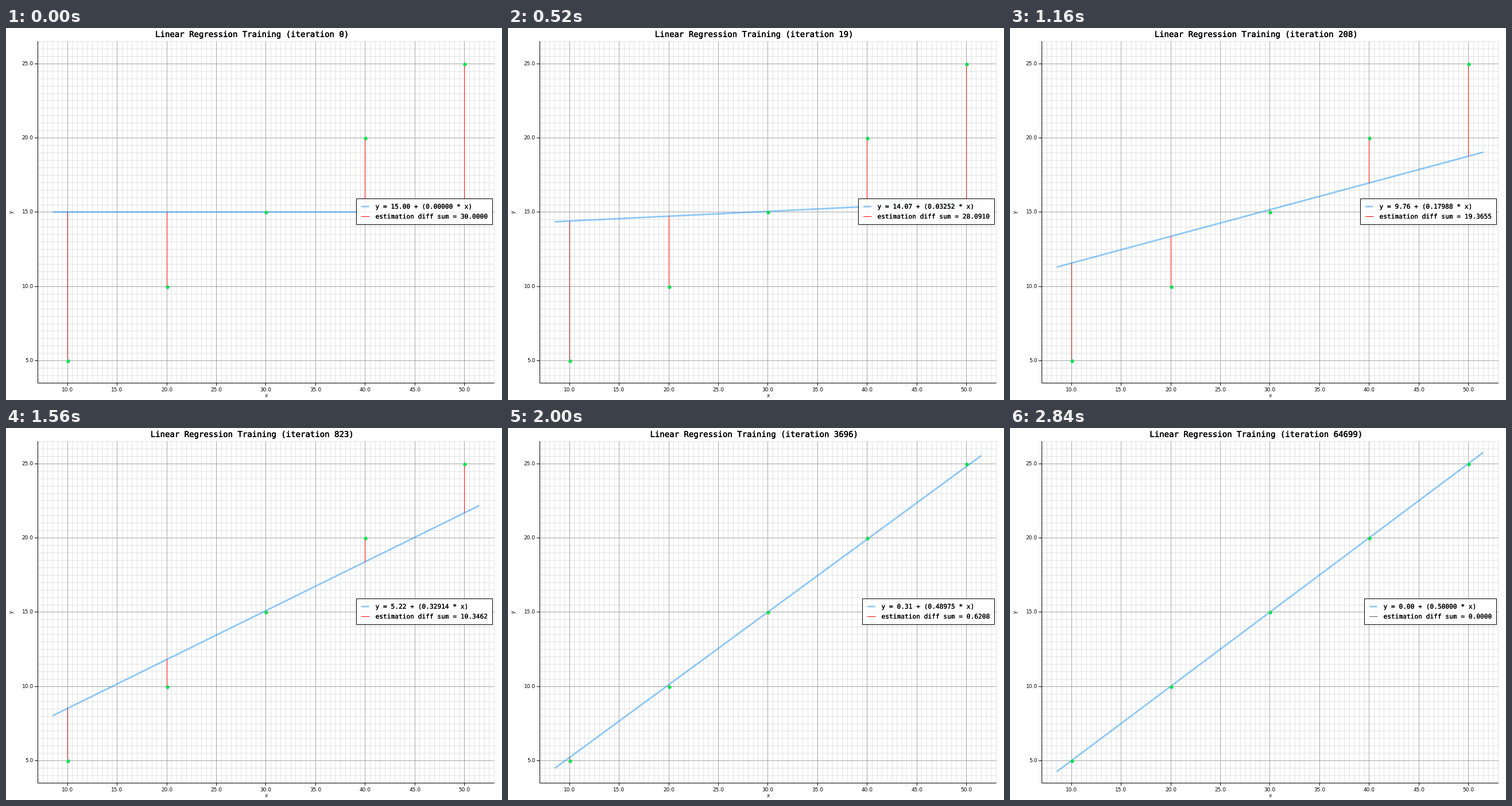
A matplotlib script that plays this animation: 864 px wide and 648 px high, repeating every 2880 ms.

```python
import numpy as np
import matplotlib.pyplot as plt
from matplotlib.animation import FuncAnimation
from matplotlib.collections import LineCollection
from matplotlib.patches import Rectangle
from matplotlib.patheffects import withStroke

plt.rcParams["path.snap"] = False  # pixel centres are set explicitly

W, H = 864, 648
FRAMES, STEP = 72, 40
LEFT, RIGHT, TOP, BOTTOM = 55, 850, 23, 618
BLUE, RED, GREEN = "#2196f3", "#ff0000", "#15dd55"
MONO, SANS = "DejaVu Sans Mono", "DejaVu Sans"

XS = np.arange(10, 51, 10)
YS = XS / 2

# Iteration schedule: close to geometric growth through these points
KNOT_FRAMES = [0, 13, 29, 39, 45, 57, 71]
KNOT_ITERS = [0, 19, 208, 823, 1873, 9562, 64699]


def iteration(frame):
    n = np.exp(np.interp(frame, KNOT_FRAMES, np.log(np.add(KNOT_ITERS, 4)))) - 4
    return max(frame, int(round(n)))


def fit(n):
    """Gradient descent state after n steps: a slow and a fast decaying mode."""
    slow, fast = np.exp(-0.00097926 * n), np.exp(-0.0128583 * n)
    gap = 0.382513 * slow + 0.117487 * fast
    middle = 0.2118 * (slow - fast)
    return 30 * gap + middle, 0.5 - gap


def px(x):
    return LEFT + (np.asarray(x, float) - 7) * (RIGHT - LEFT) / 46


def py(y):
    return BOTTOM - (np.asarray(y, float) - 3.5) * (BOTTOM - TOP) / 23


def snap(v):
    """Centre of the nearest pixel."""
    return np.round(v) + 0.5


fig = plt.figure(figsize=(W / 72, H / 72), dpi=72, facecolor="white")
ax = fig.add_axes([0, 0, 1, 1])
ax.set_xlim(0, W)
ax.set_ylim(H, 0)
ax.axis("off")


def grid(xs, ys, color, z):
    segs = [[(x, TOP), (x, BOTTOM)] for x in snap(px(xs))]
    segs += [[(LEFT, y), (RIGHT + 1, y)] for y in snap(py(ys))]
    ax.add_collection(LineCollection(segs, colors=color, linewidths=1, zorder=z))


def line(xs, ys, color, width, z, **kw):
    return ax.plot(xs, ys, color=color, lw=width, zorder=z,
                   solid_capstyle="butt", **kw)[0]


def label(x, y, s, size=9, font=SANS, ha="center", va="baseline", weight=0, **kw):
    """Text; weight is the width of an extra outline for medium-weight type."""
    text = ax.text(x, y, s, fontsize=size, family=font, ha=ha, va=va,
                   color="black", **kw)
    if weight:
        text.set_path_effects([withStroke(linewidth=weight, foreground="black")])
    return text


x_ticks, y_ticks = np.arange(10, 51, 5), np.arange(5, 26, 5)
grid(np.arange(7, 53.1, 0.5), np.arange(3.5, 26.6, 0.5), "#e2e2e2", 1)
grid(x_ticks, y_ticks, "#a6a6a6", 2)

line([LEFT + 0.5] * 2, [TOP, BOTTOM + 1], "black", 1, 3)
line([LEFT, RIGHT + 1], [BOTTOM + 0.5] * 2, "black", 1, 3)
for t in x_ticks:
    x = snap(px(t))
    line([x, x], [BOTTOM, BOTTOM + 5], "black", 1, 3)
    label(x - 0.3, 633, f"{t:.1f}")
for t in y_ticks:
    y = snap(py(t))
    line([LEFT - 5, LEFT], [y, y], "black", 1, 3)
    label(47.7, y + 2.7, f"{t:.1f}", ha="right")
label(453.7, 642.6, "x")
label(9.5, 320, "y", va="center", rotation=90)

title = label(427.6, 15.6, "", 14, MONO, weight=0.4)

stems = [line([], [], "#a0080a" if x == 10 else RED, 1, 5) for x in XS]
model = line([], [], BLUE, 2.8, 4, alpha=0.5)
ax.scatter(snap(px(XS)), snap(py(YS)), s=6.4 ** 2, c=GREEN, linewidths=0, zorder=6)

# Legend, right edge fixed, width follows the text
box = Rectangle((0, 297.5), 1, 45, fc=(1, 1, 1, 0.9), ec="black", lw=1, zorder=8)
ax.add_patch(box)
key_model = line([], [], BLUE, 2.8, 9, alpha=0.5)
key_diff = line([], [], RED, 1, 9)
txt_model = label(0, 314.7, "", 11.2, MONO, "left", weight=0.2, zorder=9)
txt_diff = label(0, 332, "", 11.2, MONO, "left", weight=0.2, zorder=9)


def draw(frame):
    n = iteration(frame)
    b, m = fit(n)
    est = b + m * XS
    total = np.abs(est - YS).sum()

    title.set_text(f"Linear Regression Training (iteration {n})")
    ends = np.array([8.5, 51.5])
    model.set_data(px(ends) + 0.5, py(b + m * ends))
    for stem, x, y, e in zip(stems, XS, YS, est):
        sx = snap(px(x))
        stem.set_data([sx, sx], [py(y), py(e)])

    txt_diff.set_text(f"estimation diff sum = {total:.4f}")
    txt_model.set_text(f"y = {b:.2f} + ({m:.5f} * x)")
    left = 610.5 if total >= 10 else 617.5
    box.set_x(left)
    box.set_width(847.5 - left)
    txt_model.set_x(left + 33)
    txt_diff.set_x(left + 33)
    key_model.set_data([left + 8.5, left + 22], [311, 311])
    key_diff.set_data([left + 8.5, left + 23], [328.5, 328.5])
    key_diff.set_color(RED if total > 0.12 else "#5c5c5c")
    return []


anim = FuncAnimation(fig, draw, frames=FRAMES, interval=STEP, repeat=True,
                     repeat_delay=0, blit=False)
plt.show()
```
